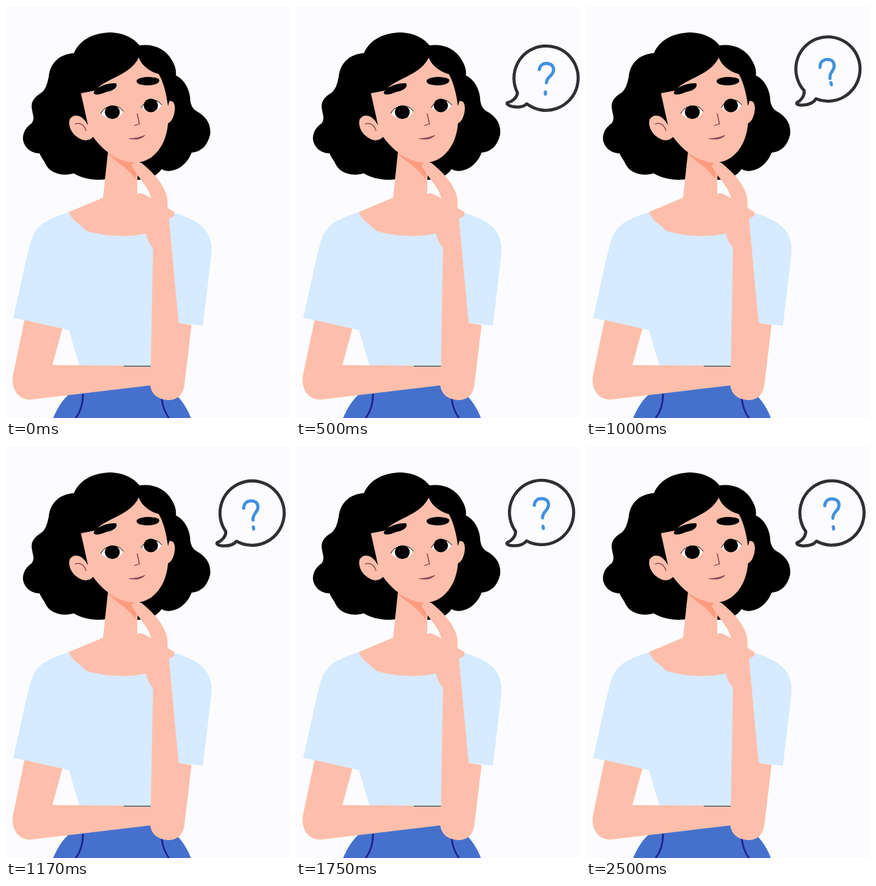
An HTML page for the animation above (2.58 s loop, 398 by 576 pixels).

```html
<!DOCTYPE html>
<html lang="en">
<head>
<meta charset="utf-8">
<title>Thinking woman</title>
<style>
  html, body { margin: 0; width: 100%; height: 100%; overflow: hidden; background: #fcfcff; }
  svg { display: block; width: 398px; height: 576px; }
  .skin { fill: #fdbfab; }
  .line { fill: none; stroke-linecap: round; stroke-linejoin: round; }
</style>
</head>
<body>
<svg viewBox="0 0 398 576">
  <!-- hair -->
  <path d="M95 66C104 46 124 37 148 37C166 38 179 45 187 55C206 52 224 60 232 75C237 83 239 90 238 97C247 101 256 112 258 128C258 138 262 144 267 147C280 154 288 165 286 180C282 196 273 204 260 205C253 225 232 236 218 228C212 237 202 242 184 243L141 242C124 245 107 241 95 234C77 239 62 233 56 222C52 214 49 211 47 206C31 206 22 192 24 182C25 174 30 168 36 164C41 157 37 151 36 142C35 133 41 127 47 123C56 118 58 108 60 98C62 80 75 67 95 66Z"/>

  <!-- neck, shirt, skirt -->
  <path fill="#d6ebff" d="M88 288C63 297 44 302 36 326C30 342 22 385 10 436L88 453L103 503H230L242 443L276 447L288 345C290 315 272 300 236 289L200 300Z"/>
  <path class="skin" d="M143 203L136 268L88 288C92 300 103 304 112 314C135 322 170 324 197 318L236 293V288L195 264H184V243L187 215Z"/>
  <path fill="#fe9c80" d="M143 205C155 214 170 219 187 217L181 242C173 229 160 222 145 209Z"/>
  <path fill="#4571cd" d="M66 576C72 562 79 551 88 543L205 528L240 545C250 556 256 567 259 576Z"/>
  <path class="line" stroke="#20208c" stroke-width="2.5" d="M108 543C108 557 104 568 97 577M218 547C219 559 223 569 229 577"/>

  <!-- arms and hand -->
  <path class="skin" d="M26 439L79 451L65 502L206 503V530L37 550C18 552 6 536 10 515Z"/>
  <path stroke="#26405c" d="M165 503.5H204"/>
  <path class="skin" d="M176 223C180 216 188 217 193 222C203 231 217 242 225 264C227 272 226 280 227 285L236 289L235 294H228L242 443L260 446L250 530C248 543 241 551 227 551C212 550 203 542 202 529L203 503L206 338C201 333 198 326 196 318L184 300V263C191 259 198 266 204 275C204 256 187 244 176 223Z"/>

  <!-- head -->
  <path class="skin" d="M105 122L126 118C136 102 174 98 186 72C190 84 204 93 214 95C221 107 225 124 227 140L229 133C236 131 238 141 236 149C234 158 231 162 227 164C225 193 208 218 182 219C160 219 137 204 122 183C117 189 108 189 101 184C91 178 87 167 89 159C94 150 107 151 115 167Z"/>
  <path class="line" stroke="#85414f" stroke-width="1.3" d="M97 165C104 162 110 167 112 174M184 151L187 165L180 167"/>
  <path fill="#8d4153" d="M171 185C180 185 189 183 196 180C190 187 180 188 171 185Z"/>
  <path d="M123 122C124 113 144 107 154 108C158 112 151 119 141 120C133 124 124 125 123 122ZM183 104C187 98 207 98 214 102C217 107 211 110 200 111C190 111 182 109 183 104Z"/>
  <path fill="#fff" d="M133 150C138 138 158 136 164 147C160 160 141 161 133 150ZM190 142C195 130 210 127 218 138C213 150 198 151 190 142Z"/>
  <ellipse cx="149" cy="148.500" rx="10.500" ry="9.500"/>
  <ellipse cx="203" cy="139" rx="10" ry="9.500"/>
  <path class="line" stroke="#000" d="M133 150C138 138 158 136 164 147M190 142C195 130 210 127 218 138"/>

  <!-- speech bubble -->
  <g id="bubble">
    <path class="line" stroke="#302e33" stroke-width="4.300" d="M323 133A45 45 0 1 0 308 119.600C308 127 302 133 296 135C294 137 298 139 303 139.500C313 140 320 137 323 133Z"/>
    <g class="line" stroke="#4191dd" stroke-width="4.400">
      <path id="hook" d="M334.500 84C335 78 339 74.500 344.500 74.500C351 74.500 355 78 354.500 84C354 92 346 92 346 101.500"/>
      <path d="M346.500 113L347 116"/>
    </g>
  </g>
</svg>
<script>
  const LOOP = 2580, FPS = 12;
  const bubble = document.getElementById('bubble');
  const hook = document.getElementById('hook');

  // Damped sine that crosses zero at `start`
  const wave = (t, start, half, amp, decay) =>
    amp * Math.sin((t - start) / half * Math.PI) * Math.exp(-decay * (t - start));

  const swing = t => t < 720 ? (720 - t) * 0.0364 : wave(t, 720, 440, -17, 0.0029);
  const hookTilt = t => t < 830 ? (t - 500) * 0.0236 - 3 : wave(t, 950, 780, -9, 0.0012);
  const hookShift = t => t < 700 ? (t - 700) * 0.0075 : wave(t, 700, 540, 9, 0.0015);

  function grow(t) {
    const p = Math.min(1, Math.max(0, (t - 40) / 380));
    return 1 - (1 - p) ** 2;
  }

  function draw(now) {
    const frame = Math.min(30, Math.floor(now % LOOP * FPS / 1000 + 0.1));
    const t = frame * 1000 / FPS;
    const size = grow(t);
    bubble.setAttribute('visibility', size ? 'visible' : 'hidden');
    bubble.setAttribute('transform',
      `translate(296 138) rotate(${swing(t)}) scale(${size}) translate(-296 -138)`);
    hook.setAttribute('transform', `translate(0 ${hookShift(t)}) rotate(${hookTilt(t)} 346 101)`);
    requestAnimationFrame(now => draw(now - begin));
  }

  const begin = performance.now();
  draw(0);
</script>
</body>
</html>
```
